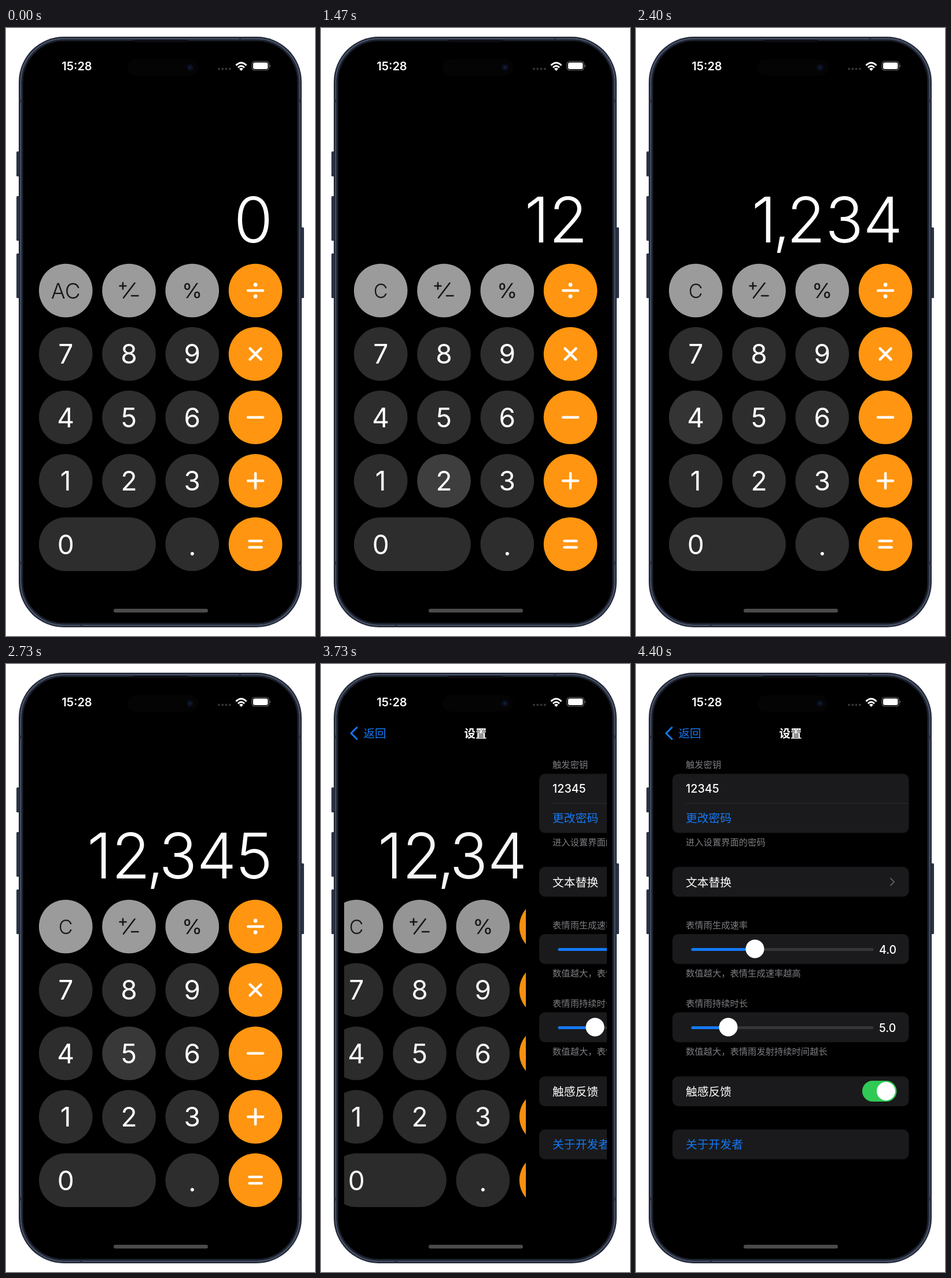
An HTML page for the animation above (5.27 s loop, 534x1049 px).

```html
<!DOCTYPE html>
<html lang="zh-CN">
<head>
<meta charset="utf-8">
<title>计算器</title>
<style>
  html, body { margin: 0; width: 100%; height: 100%; overflow: hidden; background: #fff; }
  svg { display: block; width: 100%; height: 100%; }
  text { font-family: Inter, "Noto Sans CJK SC", "Noto Sans CJK", sans-serif; }
  .line { fill: none; stroke-linecap: round; stroke-linejoin: round; }
  .mid { text-anchor: middle; }
</style>
</head>
<body>
<svg viewBox="0 0 534 1049">
  <defs>
    <clipPath id="screen"><rect x="40" y="100" width="454" height="880"/></clipPath>
  </defs>

  <g id="phone">
    <g fill="#2c3345">
      <rect x="18" y="213" width="6" height="43" rx="1.5"/>
      <rect x="18" y="290" width="6" height="77" rx="1.5"/>
      <rect x="18" y="389" width="6" height="77" rx="1.5"/>
      <rect x="509" y="344" width="6" height="122" rx="1.5"/>
    </g>
    <rect x="22" y="15" width="489" height="1019" rx="78" fill="#232938"/>
    <rect x="25.5" y="18.5" width="482" height="1012" rx="74.5" fill="#11141b" stroke="#4d586f" stroke-width="2"/>
    <rect x="27.5" y="20.5" width="478" height="1008" rx="72.5" fill="none" stroke="#232938" stroke-width="2"/>
    <rect x="30" y="23" width="473" height="1003" rx="70"/>
    <g fill="#2a3040">
      <rect x="22" y="123" width="5" height="6"/>
      <rect x="506" y="123" width="5" height="6"/>
      <rect x="22" y="920" width="5" height="6"/>
      <rect x="506" y="920" width="5" height="6"/>
      <rect x="402" y="15" width="5" height="5"/>
      <rect x="127" y="1029" width="5" height="5"/>
    </g>
    <rect x="219" y="20.5" width="96" height="4" rx="2" fill="#0b0d12"/>
  </g>

  <g clip-path="url(#screen)">
    <g id="calculator">
      <text id="display" x="460.500" y="369.500" text-anchor="end" font-size="109" font-weight="300"
            letter-spacing="-0.5" fill="#fff">0</text>
      <g id="keys"></g>
    </g>
    <g id="settings" font-weight="500">
      <rect x="40" y="100" width="454" height="880"/>
    </g>
  </g>

  <g id="nav">
    <path class="line" d="M62 109.500L52 119.500L62 129.500" stroke="#1479f5" stroke-width="3"/>
    <text x="73.500" y="126.500" font-size="19.500" font-weight="500" fill="#1479f5">返回</text>
    <text class="mid" x="267" y="126.500" font-size="19.500" font-weight="700" fill="#fff">设置</text>
  </g>

  <g id="status">
    <rect x="210" y="54" width="122" height="28" rx="14" fill="#040404"/>
    <circle cx="318" cy="68" r="6" fill="#080d1a"/>
    <circle cx="318" cy="68" r="2.500" fill="#101c38"/>
    <text class="mid" x="122.500" y="73" font-size="20" font-weight="600" fill="#fff">15:28</text>
    <path class="line" d="M368 70.500H390" stroke="#363636" stroke-width="4" stroke-dasharray="0 6.300"/>
    <g fill="none" stroke="#fff" stroke-width="3">
      <path d="M397.500 64.500Q406.500 55.500 415.500 64.500"/>
      <path d="M401 68.200Q406.500 62.800 412 68.200"/>
    </g>
    <path d="M403 70.300Q406.500 67 410 70.300L406.500 74Z" fill="#fff"/>
    <rect x="425" y="57.500" width="29.500" height="15.500" rx="5" fill="none" stroke="#666" stroke-width="1.200"/>
    <rect x="427" y="59.500" width="25.500" height="11.500" rx="3.200" fill="#fff"/>
    <path d="M456 63Q458.500 65.300 456 67.800Z" fill="#777"/>
    <rect x="186" y="1002" width="163" height="6.500" rx="3.200" fill="#4b4b4b"/>
  </g>
</svg>
<script>
const $ = id => document.getElementById(id);

function add(parent, tag, attrs, text = "") {
  const node = document.createElementNS("http://www.w3.org/2000/svg", tag);
  for (const name in attrs) node.setAttribute(name, attrs[name]);
  node.textContent = text;
  return parent.appendChild(node);
}

// Calculator keys
const keys = $("keys"), digitKeys = {};
const column = i => 103.2 + 109.3 * i;
const row = i => 453 + 109.4 * i;
const RADIUS = 46.3;

function key(col, line, fill, span = 0) {
  return add(keys, "rect", {
    x: column(col) - RADIUS, y: row(line) - RADIUS,
    width: 2 * RADIUS + 109.3 * span, height: 2 * RADIUS, rx: RADIUS, fill
  });
}
function label(col, line, text, size, dy, fill, weight = 400) {
  return add(keys, "text", {
    class: "mid", x: column(col), y: row(line) + dy,
    "font-size": size, "font-weight": weight, fill
  }, text);
}
function symbol(col, line, d, stroke, width) {
  add(keys, "path", {
    class: "line", d, stroke, "stroke-width": width,
    transform: `translate(${column(col)} ${row(line)})`
  });
}

for (let i = 0; i < 3; i++) key(i, 0, "#9b9b9b");
const clearLabel = label(0, 0, "AC", 37, 13.5, "#161616", 300);
symbol(1, 0, "M-16 -8H-5M-10.500 -13.500V-2.500M-9.500 12.500L10 -13M4.500 9H16", "#161616", 2.6);
label(2, 0, "%", 36, 13, "#161616");

["789", "456", "123"].forEach((digits, i) => [...digits].forEach((digit, col) => {
  digitKeys[digit] = key(col, i + 1, "#2d2d2d");
  label(col, i + 1, digit, 46, 17, "#fff");
}));
key(0, 4, "#2d2d2d", 1);
label(0, 4, "0", 46, 17, "#fff");
key(2, 4, "#2d2d2d");
label(2, 4, ".", 46, 19, "#fff");

const operators = [
  "M-13 0H13",
  "M-9.500 -9.500L9.500 9.500M9.500 -9.500L-9.500 9.500",
  "M-13 0H13",
  "M-13 0H13M0 -13V13",
  "M-10.500 -5.500H10.500M-10.500 5.500H10.500"
];
operators.forEach((d, i) => {
  key(3, i, "#ff9510");
  symbol(3, i, d, "#fff", 4.5);
});
symbol(3, 0, "M0 -10V-10M0 10V10", "#fff", 6.8);

// Settings page
const settings = $("settings");
const BLUE = "#1479f5", GRAY = "#7d7d82";

const group = (y, height = 51.5) =>
  add(settings, "rect", { x: 63, y, width: 408.5, height, rx: 10, fill: "#1a1a1c" });
const write = (text, y, size, fill, x = 86) =>
  add(settings, "text", { x, y: y + size * 0.37, "font-size": size, fill }, text);
const note = (text, y) => write(text, y, 15.3, GRAY);
const item = (text, y, fill = "#fff") => write(text, y, 19.8, fill);
const stroke = (d, color, width) =>
  add(settings, "path", { class: "line", d, stroke: color, "stroke-width": width });
const knob = (cx, cy) => add(settings, "circle", { cx, cy, r: 16, fill: "#fff" });

function slider(top, thumb, value) {
  const y = top + 26.5;
  group(top);
  stroke(`M98 ${y}H408`, "#363639", 5);
  stroke(`M98 ${y}H${thumb}`, BLUE, 5);
  knob(thumb, y - 1);
  write(value, y, 19.5, "#fff", 420);
}

note("触发密钥", 173);
group(189.5, 102);
item("12345", 215);
stroke("M86 240.500H471", "#2b2b2e", 1);
item("更改密码", 266, BLUE);
note("进入设置界面的密码", 307);
group(350);
item("文本替换", 376.5);
stroke("M440 370L446 376L440 382", "#56565a", 2.4);
note("表情雨生成速率", 450.5);
slider(466, 205.5, "4.0");
note("数值越大，表情生成速率越高", 533.5);
note("表情雨持续时长", 585.5);
slider(601, 159.5, "5.0");
note("数值越大，表情雨发射持续时间越长", 668.5);
group(711.5);
item("触感反馈", 737.5);
add(settings, "rect", { x: 391, y: 719, width: 59.5, height: 36, rx: 18, fill: "#2fca54" });
knob(432, 737);
group(803);
item("关于开发者", 829, BLUE);

// Timeline
const LOOP = 5270, STEP = 1000 / 15;
const FIRST_PRESS = 14 * STEP, PRESS_GAP = 6 * STEP;
const PUSH_START = 55 * STEP, SETTLED = 66 * STEP;
const WIDTH = 454, COMMA_KERN = -6;

function slideProgress(elapsed) {
  if (elapsed <= 0) return 0;
  const x = elapsed * 0.0168;
  return 1 - (1 + x) * Math.exp(-x);
}

function showNumber(digits) {
  const text = Number(digits).toLocaleString("en-US");
  const kerning = [...text].map((char, i) => char === "," || text[i - 1] === "," ? COMMA_KERN : 0);
  $("display").textContent = text;
  $("display").setAttribute("dx", kerning.join(" "));
}

function draw(ms) {
  const t = Math.floor((ms + 3.4) / STEP) * STEP + 0.01;
  const pressed = Math.max(0, Math.min(5, Math.floor((t - FIRST_PRESS) / PRESS_GAP) + 1));
  showNumber("12345".slice(0, pressed));
  clearLabel.textContent = pressed ? "C" : "AC";
  clearLabel.setAttribute("font-size", pressed ? 34 : 37);
  clearLabel.setAttribute("y", row(0) + (pressed ? 12.5 : 13.5));

  for (let digit = 1; digit <= 5; digit++) {
    const elapsed = t - FIRST_PRESS - (digit - 1) * PRESS_GAP;
    const glow = elapsed < 0 || elapsed > 530 ? 0 : Math.exp(-elapsed / 140);
    const level = Math.round(45 + 45 * glow);
    digitKeys[digit].setAttribute("fill", `rgb(${level},${level},${level})`);
  }

  const progress = t >= SETTLED ? 1 : slideProgress(t - PUSH_START - 0.02);
  $("calculator").setAttribute("transform", `translate(${-0.3 * WIDTH * progress} 0)`);
  $("calculator").setAttribute("opacity", 1 - 0.12 * progress);
  $("settings").setAttribute("transform", `translate(${WIDTH * (1 - progress)} 0)`);
  $("settings").setAttribute("visibility", progress ? "visible" : "hidden");
  $("nav").setAttribute("visibility", progress ? "visible" : "hidden");
}

const start = performance.now();
function tick() {
  draw((performance.now() - start) % LOOP);
  requestAnimationFrame(tick);
}
tick();
</script>
</body>
</html>
```
